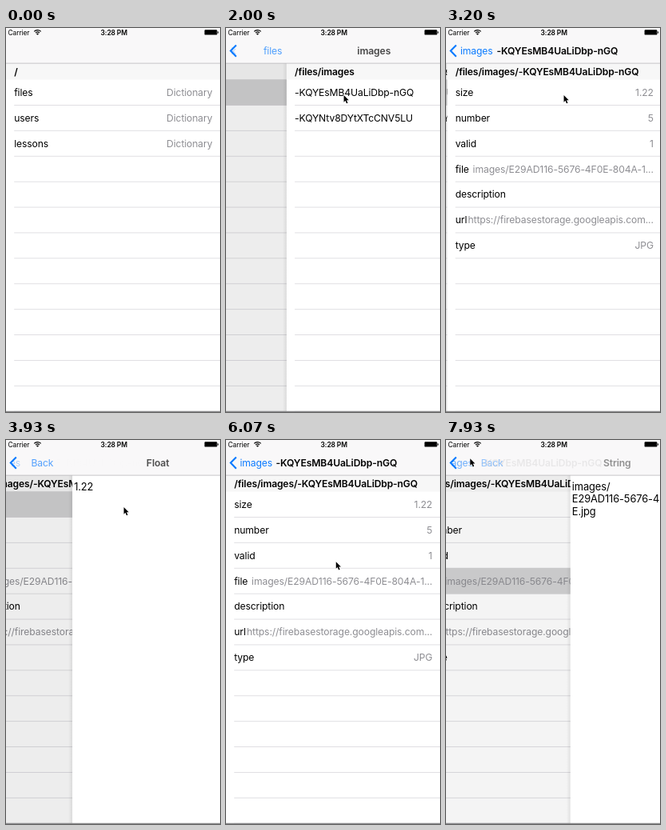
These frames come from a looping animation (268x480 px, 8 s). An HTML page with a canvas:

```html
<!DOCTYPE html>
<html lang="en">
<head>
<meta charset="utf-8">
<title>Data browser</title>
<style>
html, body { margin: 0; width: 100%; height: 100%; overflow: hidden; background: #fff; }
canvas { display: block; width: 268px; height: 480px; }
</style>
</head>
<body>
<canvas id="stage"></canvas>
<script>
const W = 268, H = 480, LOOP = 8000;
const BAR = 44, HEAD = 64.6, ROW = 31.9, PAD = 10.2, BACK_X = 17.4;
const BLUE = '#0a7aff', GREY = '#8e8e93', SIZE = 12.15;
const FAMILY = 'Inter, "Liberation Sans", sans-serif';

const canvas = document.getElementById('stage');
const ctx = canvas.getContext('2d');
const dpr = window.devicePixelRatio || 1;
canvas.width = W * dpr;
canvas.height = H * dpr;

const KEY = '-KQYEsMB4UaLiDbp-nGQ';
const pages = {
  root: { path: '/', rows: [['files', 'Dictionary'], ['users', 'Dictionary'], ['lessons', 'Dictionary']] },
  files: { title: 'files', back: 'Back', path: '/files', rows: [['images', 'Dictionary']] },
  images: { title: 'images', back: 'files', path: '/files/images', rows: [[KEY], ['-KQYNtv8DYtXTcCNV5LU']] },
  item: {
    title: KEY, back: 'images', path: '/files/images/' + KEY,
    rows: [
      ['size', '1.22'], ['number', '5'], ['valid', '1'],
      ['file', 'images/E29AD116-5676-4F0E-804A-1...'],
      ['description'],
      ['url', 'https://firebasestorage.googleapis.com...'],
      ['type', 'JPG']
    ]
  },
  float: { title: 'Float', back: 'Back', text: ['1.22'] },
  string: { title: 'String', back: 'Back', text: ['images/', 'E29AD116-5676-4F0E-804A-1335B45B0AF', 'E.jpg'] }
};

// Screen changes: start time, lower page, upper page, selected row, direction
const moves = [
  [1030, 'root', 'files', 0, 'push'],
  [1863, 'files', 'images', 0, 'push'],
  [2800, 'images', 'item', 0, 'push'],
  [3800, 'item', 'float', 0, 'push'],
  [5290, 'item', 'float', 0, 'pop'],
  [6530, 'item', 'string', 3, 'push'],
  [7824, 'item', 'string', 3, 'pop']
].map(([at, lo, hi, row, kind]) => ({ at, lo: pages[lo], hi: pages[hi], row, push: kind === 'push' }));

// Pointer stops: time, x, y
const pointer = [
  [530, 205, 482], [960, 147.3, 83.8], [4730, 147.3, 83.8], [5190, 30, 23], [5650, 30, 23],
  [6070, 137.5, 152], [6350, 147.3, 177.8], [7270, 147.3, 177.8], [7730, 30, 23]
];

const lerp = (a, b, k) => a + (b - a) * k;
const clamp = v => Math.max(0, Math.min(1, v));
const smooth = k => k * k * (3 - 2 * k);

// Critically damped spring, settled after half a second
function spring(ms) {
  if (ms >= 500) return 1;
  const a = 0.01826 * Math.max(0, ms);
  return 1 - (1 + a) * Math.exp(-a);
}

function setFont(weight, size) {
  ctx.font = `${weight} ${size}px ${FAMILY}`;
  ctx.letterSpacing = '-0.11px';
}

function text(str, x, y, { weight = 400, size = SIZE, color = '#000', align = 'left', alpha = 1 } = {}) {
  if (!str || alpha <= 0) return;
  setFont(weight, size);
  ctx.globalAlpha = alpha;
  ctx.fillStyle = color;
  ctx.textAlign = align;
  ctx.fillText(str, x, y);
  ctx.globalAlpha = 1;
}

function widthOf(str, weight) {
  setFont(weight, SIZE);
  return str ? ctx.measureText(str).width : 0;
}

function rect(color, x, y, w, h) {
  ctx.fillStyle = color;
  ctx.fillRect(x, y, w, h);
}

function drawPage(page, x, selected, glow) {
  ctx.save();
  ctx.translate(x, 0);
  rect('#fff', 0, BAR, W, H - BAR);
  if (page.text) {
    page.text.forEach((line, i) => text(line, 2, 62.9 + i * 15.5, { size: 12.87 }));
  } else {
    for (let y = HEAD + ROW; y < H; y += ROW) rect('#dddce0', PAD, y - 0.5, W - PAD, 0.9);
    rect('#f7f7f7', 0, BAR, W, HEAD - BAR);
    text(page.path, PAD, 59.2, { weight: 600, size: 12.05 });
    if (glow > 0) {
      ctx.globalAlpha = glow;
      rect('#d2d2d3', 0, HEAD + selected * ROW - 0.4, W, ROW + 0.6);
      ctx.globalAlpha = 1;
    }
    page.rows.forEach(([label, detail], i) => {
      const y = HEAD + i * ROW + 20.2;
      text(label, PAD, y);
      text(detail, W - PAD + 0.6, y, { color: GREY, align: 'right' });
    });
  }
  ctx.restore();
}

function titleX(page) {
  const centred = W / 2 - widthOf(page.title, 600) / 2;
  return page.back ? Math.max(centred, BACK_X + widthOf(page.back, 400) + 4.5) : centred;
}

function chevron(alpha) {
  ctx.globalAlpha = alpha;
  ctx.strokeStyle = BLUE;
  ctx.lineWidth = 2.1;
  ctx.beginPath();
  ctx.moveTo(12.8, 21.4);
  ctx.lineTo(5.8, 28.6);
  ctx.lineTo(12.8, 35.8);
  ctx.stroke();
  ctx.globalAlpha = 1;
}

const navTitle = (str, x, alpha) => text(str, x, 32.8, { weight: 600, alpha });
const navLabel = (str, x, alpha) => text(str, x, 32.8, { color: BLUE, alpha });

function drawNav(lo, hi, q, travel, dim) {
  rect('#f9f8f9', 0, 0, W, BAR);
  rect('#b9b8bb', 0, BAR - 0.3, W, 0.8);
  ctx.save();
  ctx.beginPath();
  ctx.rect(7, 0, W, BAR);
  ctx.clip();
  const shared = lerp(titleX(lo), BACK_X, q);
  navLabel(lo.back, BACK_X - q * (BACK_X + widthOf(lo.back, 400)), 1 - q);
  navTitle(lo.title, shared, (1 - q) ** 5);
  navLabel(hi.back, shared, q * dim);
  navTitle(hi.title, titleX(hi) + travel * (1 - q), q);
  ctx.restore();
  chevron((lo.back ? 1 : q) * dim);
}

function drawStatus() {
  text('Carrier', 2.5, 8.6, { size: 8.45 });
  text('3:28 PM', 135.2, 8.6, { size: 8.45, weight: 600, align: 'center' });
  ctx.strokeStyle = '#000';
  ctx.lineWidth = 1.2;
  for (const r of [3.4, 5.8]) {
    ctx.beginPath();
    ctx.arc(39.5, 8.4, r, -Math.PI * 0.76, -Math.PI * 0.24);
    ctx.stroke();
  }
  ctx.fillStyle = '#000';
  ctx.beginPath();
  ctx.moveTo(39.5, 8.8);
  ctx.arc(39.5, 8.8, 2.2, -Math.PI * 0.76, -Math.PI * 0.24);
  ctx.fill();
  ctx.beginPath();
  ctx.roundRect(248.6, 2.2, 15.8, 6.4, 1.2);
  ctx.fill();
  rect('#000', 265, 4.4, 1, 2.2);
}

function drawPointer(t) {
  if (t < pointer[0][0]) return;
  let i = pointer.length - 1;
  while (pointer[i][0] > t) i--;
  const [t0, x0, y0] = pointer[i];
  const [t1, x1, y1] = pointer[i + 1] || [t0 + 1, x0, y0];
  const k = smooth(clamp((t - t0) / (t1 - t0)));
  ctx.save();
  ctx.translate(lerp(x0, x1, k), lerp(y0, y1, k));
  ctx.scale(0.85, 0.85);
  ctx.beginPath();
  [[0.3, 0.3], [0.3, 10.4], [2.6, 8.3], [4.3, 12.4], [6.1, 11.6], [4.4, 7.6], [7.6, 7.5]]
    .forEach(([x, y]) => ctx.lineTo(x, y));
  ctx.closePath();
  ctx.strokeStyle = '#fff';
  ctx.lineWidth = 1.3;
  ctx.stroke();
  ctx.fillStyle = '#000';
  ctx.fill();
  ctx.restore();
}

function drawScene(t) {
  const past = moves.filter(m => t >= m.at);
  const now = past[past.length - 1];
  const next = moves[past.length];
  const soon = next ? next.at - t : Infinity;
  const dim = next && !next.push && soon < 110 ? 0.3 : 1;
  const pressed = next && next.push && soon < 50;

  const p = now ? spring(t - now.at) : 1;
  if (p < 1) {
    const q = now.push ? p : 1 - p;
    const glow = now.push ? 1 : clamp((460 - (t - now.at)) / 300);
    drawPage(now.lo, -0.3 * W * q, now.row, glow);
    rect(`rgba(0,0,0,${0.1 * q})`, 0, BAR, W, H - BAR);
    const edge = W * (1 - q);
    const shade = ctx.createLinearGradient(edge - 5, 0, edge, 0);
    shade.addColorStop(0, 'rgba(0,0,0,0)');
    shade.addColorStop(1, `rgba(0,0,0,${0.08 * clamp(4 * (1 - q))})`);
    rect(shade, edge - 5, BAR, 5, H - BAR);
    drawPage(now.hi, edge, 0, 0);
    drawNav(now.lo, now.hi, q, now.push ? 181 : 138, 1);
  } else {
    const page = !now ? pages.root : now.push ? now.hi : now.lo;
    drawPage(page, 0, pressed ? next.row : 0, pressed ? 1 : 0);
    if (page.back) drawNav(pages.root, page, 1, 0, dim);
    else drawNav(page, pages.files, 0, W, 1);
  }
  drawStatus();
  rect('#8c8c8e', 0, H - 1.2, W, 1.2);
  drawPointer(t);
}

function frame(now) {
  ctx.setTransform(dpr, 0, 0, dpr, 0, 0);
  rect('#fff', 0, 0, W, H);
  drawScene((now - start) % LOOP);
  requestAnimationFrame(frame);
}

const start = performance.now();
requestAnimationFrame(ts => frame(Math.max(ts, start)));
</script>
</body>
</html>
```
